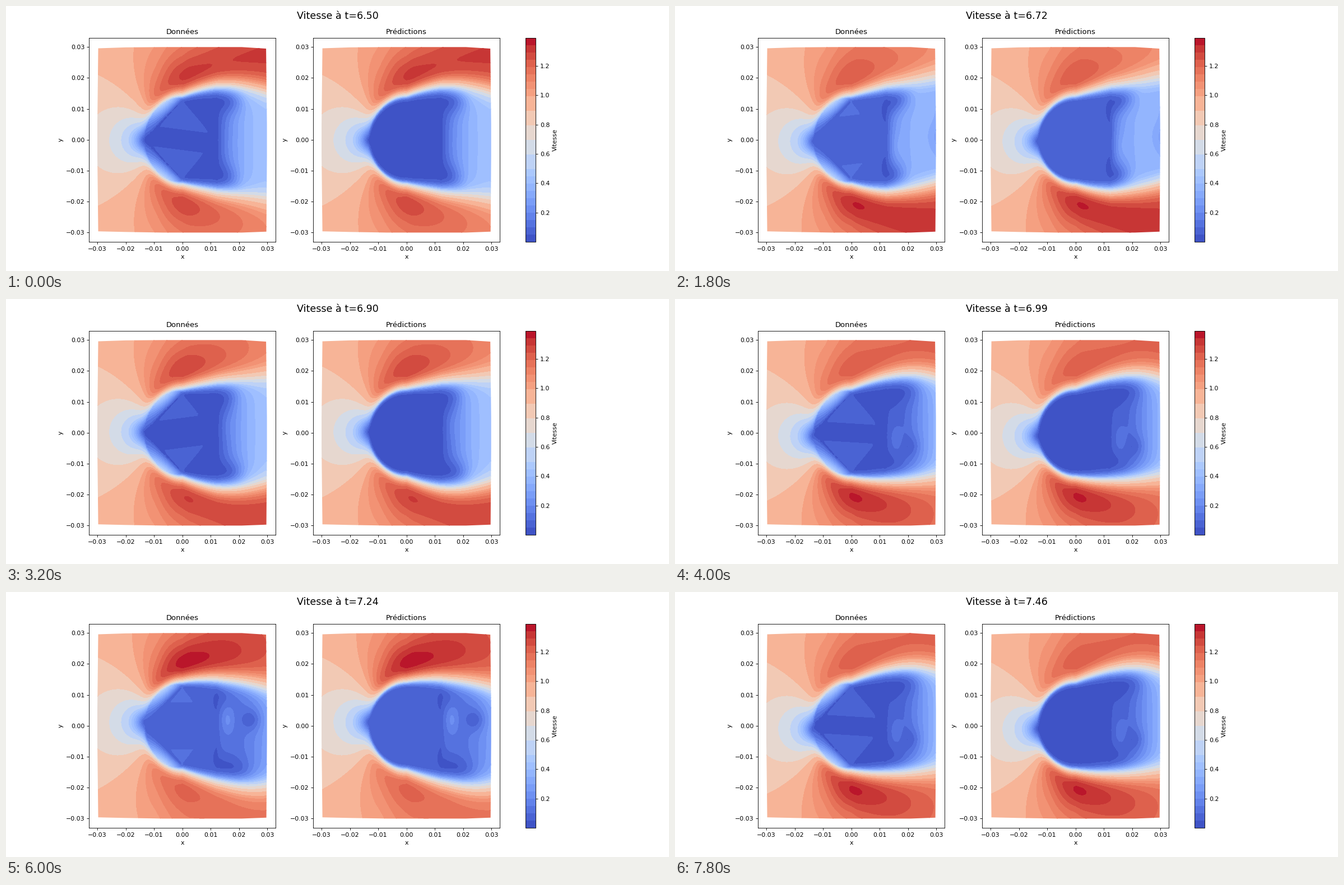
A matplotlib script that plays this animation: 1183x473 px, repeating every 8 s.

```python
import numpy as np
import matplotlib.pyplot as plt
from matplotlib.animation import FuncAnimation
from matplotlib.patches import Polygon

W, H = 1183, 473
DPI = W / 15
FRAMES, INTERVAL = 40, 200
PERIOD = 19 / 3            # frames per shedding cycle
RADIUS = 1.3               # cylinder radius, in units of 0.01
INFLOW = 0.93
TOP = 1.391
# fine bands at both ends, double bands through the pale middle
LEVELS = TOP / 28 * np.r_[0:10, 10:20:2, 20:29]
TAU = 2 * np.pi

plt.rcParams["font.family"] = "DejaVu Sans"

# Slightly irregular mesh, so the contours look sampled
rng = np.random.default_rng(4)
axis = np.linspace(-3.05, 3.05, 141)
cell = axis[1] - axis[0]
u, v = np.meshgrid(axis, axis)
u = u + rng.uniform(-0.3, 0.3, u.shape) * cell
v = v + rng.uniform(-0.3, 0.3, v.shape) * cell
r = np.hypot(u, v)
a = np.abs(v)
ahead = np.maximum(u, 0)


def wave(phase):
    return np.cos(TAU * phase)


def bell(x):
    return np.exp(-x ** 2)


def ramp(x, lo, hi):
    t = np.clip((x - lo) / (hi - lo), 0, 1)
    return t * t * (3 - 2 * t)


def potential(phase):
    """Ideal flow past the cylinder, its stagnation point swaying."""
    z = u + 1j * (v - 0.12 * wave(phase))
    size = np.maximum(np.abs(z), 1e-6)
    z = z / size * np.maximum(size, RADIUS)
    return INFLOW * np.abs(1 - RADIUS ** 2 / z ** 2)


def shear_height(side):
    """Height of the shear layer on each side of the wake."""
    mean = 1.43 + 0.27 * ahead - 0.063 * ahead ** 2
    amp = 0.115 * ahead ** 1.12
    lag = -0.1 + 0.06 * ahead
    return mean - amp * (wave(side - lag) + 0.2 * wave(2 * side))


def outer_flow(phase, side):
    swing = wave(side - 0.04 - 0.053 * ahead)
    peak = 1.31 - 0.032 * ahead + (0.085 + 0.008 * ahead) * swing
    base = 1.12 + 0.03 * ahead * swing
    spread = 0.75 + 0.3 * ahead
    behind = base + (peak - base) * bell((a - 2 - 0.1 * ahead) / spread)
    cap = peak + 0.03
    front = np.maximum(potential(phase), 1e-3)
    front = (front ** -8 + cap ** -8) ** (-1 / 8)
    mix = ramp(u, -1, 0.3)
    return front + (behind - front) * mix


def body_speed(phase):
    return 0.04 + 0.03 * wave(2 * (phase - 0.09))


def wake_flow(phase, side, height):
    s = np.maximum((u - 1.25) / 1.75, 0)
    speed = body_speed(phase) + 0.31 * s ** 0.6
    speed += 0.12 * np.tanh(4 * s) * wave(2 * (phase - 0.22 - 0.1 * (u - 2)))
    # slow tongues under the shear layers
    tip = 1.85 + 0.35 * wave(side - 0.48)
    tongue = bell((a - height + 0.5) / 0.42) * ramp(tip - u, -0.5, 0.5)
    speed *= 1 - 0.75 * tongue * ramp(u, 1, 1.4)
    # one vortex core per half cycle, from alternate sides
    for sign, shift in ((1, 0), (-1, 0.5)):
        age = (phase + shift + 0.5) % 1 - 0.5
        life = np.exp(-((age - 0.02) / 0.2) ** 4)
        cu = 2.4 + 4.8 * age
        cv = sign * max(0.2 - 3 * age, -0.1)
        speed *= 1 - 0.65 * life * bell(np.hypot(u - cu, v - cv) / 0.35)
        jet = max(wave(phase + shift), 0)
        speed += 0.09 * jet * bell((u - 1.6) / 0.22) * bell((v - sign * 0.2) / 0.45)
    return np.maximum(speed, 0.015)


def predicted(phase):
    side = phase + 0.5 * (v < 0)
    height = shear_height(side)
    shoulder = ramp(u, -1.3, 0)
    gap = np.where(u < 0, r - 1.37 - 0.06 * shoulder, a - height)
    inner = 0.06 + 0.04 * shoulder + 0.08 * ahead
    outer = 0.18 + 0.06 * shoulder + 0.08 * ahead
    blend = 0.5 + 0.5 * np.tanh(gap / np.where(gap < 0, inner, outer))
    wake = wake_flow(phase, side, height)
    return wake + (outer_flow(phase, side) - wake) * blend


def measured(phase, flow):
    """The cylinder is only known at four points, hence a diamond."""
    diamond = np.abs(u) / np.where(u < 0, 1.42, 1.3) + a / RADIUS
    tilt = np.abs(v + 0.12 * u * np.sin(TAU * phase))
    facet = 0.02 + 0.06 * np.maximum(tilt / RADIUS - 0.15, 0)
    flow = flow + facet * np.clip((1 - diamond) * 9, 0, 1)
    slope = 1.3 * a / np.maximum(r, 0.1)
    fill = 0.08 + slope * np.maximum(diamond - 1, 0)
    fill *= ramp(-u, -0.15, 0.05) * ramp(-r, -1.5, -1.36) * (diamond > 1)
    return np.maximum(flow, fill)


# the tiny margin guards the pixel size against rounding down
fig, axes = plt.subplots(1, 2, dpi=DPI,
                         figsize=((W + 1e-6) / DPI, (H + 1e-6) / DPI))
heading = fig.suptitle("", fontsize=16)
outline = [(-2.97, 2.96), (-2, 2.99), (-0.7, 3), (2.1, 3), (2.96, 2.95),
           (2.99, 0.5), (2.99, -0.5), (2.97, -2.97), (2.1, -3), (-0.7, -3),
           (-2, -2.98), (-2.97, -2.96), (-3, -0.5), (-3, 0.5)]
hulls = []
for ax, name in zip(axes, ("Données", "Prédictions")):
    ax.set(title=name, xlabel="x", ylabel="y",
           xlim=(-0.033, 0.033), ylim=(-0.033, 0.033))
    hulls.append(Polygon(np.array(outline) / 100, transform=ax.transData))

shown = []


def draw(i):
    phase = 0.263 + i / PERIOD
    flow = predicted(phase)
    while shown:
        shown.pop().remove()
    for ax, hull, field in zip(axes, hulls, (measured(phase, flow), flow)):
        field = np.clip(field, 0.001, TOP - 0.001)
        cs = ax.contourf(u / 100, v / 100, field, levels=LEVELS,
                         cmap="coolwarm", vmin=0, vmax=TOP)
        cs.set_clip_path(hull)
        shown.append(cs)
    heading.set_text(f"Vitesse à t={6.504 + 0.0245 * i:.2f}")
    return [*shown, heading]


draw(0)
fig.colorbar(shown[0], ax=axes, label="Vitesse", spacing="proportional",
             ticks=[0.2, 0.4, 0.6, 0.8, 1.0, 1.2])

anim = FuncAnimation(fig, draw, frames=FRAMES, interval=INTERVAL,
                     repeat=True, repeat_delay=0, blit=False)
plt.show()
```
